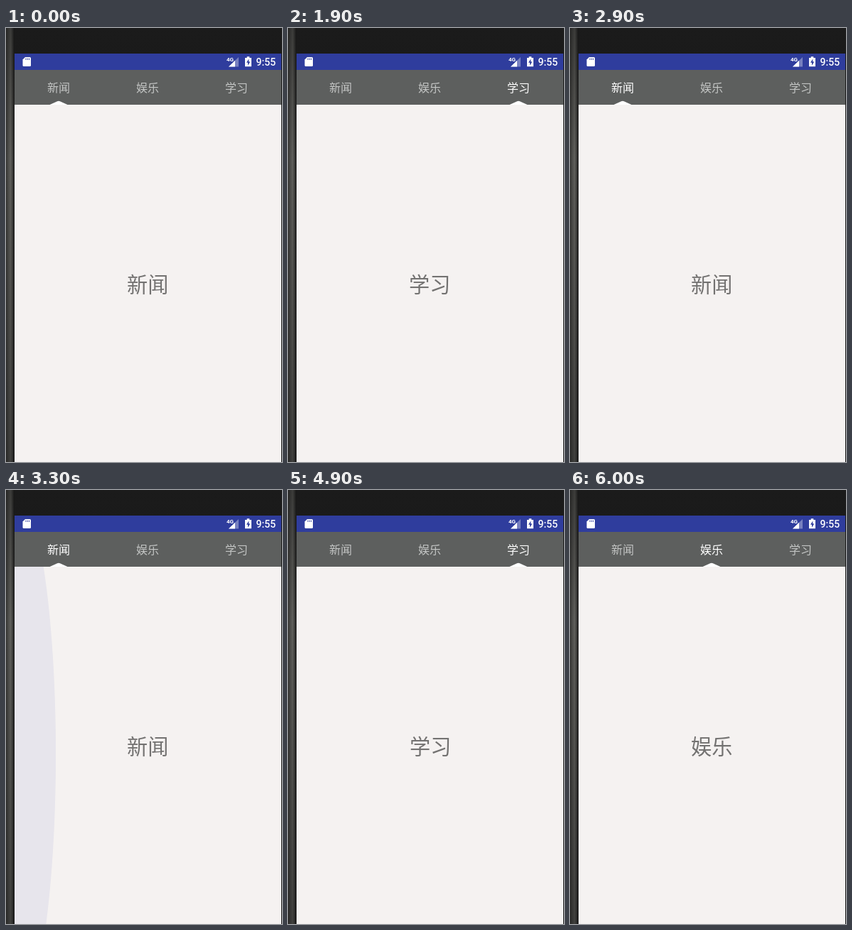
An HTML page for the animation above (6300 ms loop, 388 px wide and 611 px high).

```html
<!DOCTYPE html>
<html lang="zh">
<head>
<meta charset="utf-8">
<title>Tab pager</title>
<style>
  html, body { margin: 0; width: 100%; height: 100%; overflow: hidden; background: #151515; }
  svg { display: block; width: 388px; height: 611px; }
  text { font-family: "Noto Sans CJK SC", "Noto Sans CJK", sans-serif; text-anchor: middle; }
  .tab { font-size: 16px; fill: #c3c5c4; }
  .tab.on { fill: #fff; }
  .page { font-size: 29.2px; fill: #737271; }
  .status { font-family: Roboto, sans-serif; fill: #fff; text-anchor: start; }
</style>
</head>
<body>
<svg viewBox="0 0 388 611">
  <defs>
    <linearGradient id="top" x2="0" y2="1">
      <stop offset="0" stop-color="#1b1b1b"/>
      <stop offset="1" stop-color="#111"/>
    </linearGradient>
    <linearGradient id="side">
      <stop offset="0" stop-color="#343432"/>
      <stop offset=".3" stop-color="#50504d"/>
      <stop offset=".55" stop-color="#60605c"/>
      <stop offset=".8" stop-color="#3a3a38"/>
      <stop offset="1" stop-color="#161616"/>
    </linearGradient>
    <linearGradient id="shade" x2="0" y2="1">
      <stop offset="0" stop-color="#111" stop-opacity=".45"/>
      <stop offset=".3" stop-color="#111" stop-opacity="0"/>
      <stop offset="1" stop-color="#111" stop-opacity=".4"/>
    </linearGradient>
    <clipPath id="view"><rect x="12" y="108" width="375" height="503"/></clipPath>
  </defs>

  <rect width="388" height="611" fill="url(#top)"/>
  <rect width="12" height="611" fill="url(#side)"/>
  <rect width="12" height="611" fill="url(#shade)"/>
  <rect x="12" y="36" width="375" height="23" fill="#2f3d9d"/>
  <rect x="12" y="59" width="375" height="49" fill="#5d5f5e"/>
  <rect x="12" y="108" width="375" height="503" fill="#f5f2f1"/>

  <g fill="#fff">
    <path d="M27 41h6.5q1.5 0 1.5 1.5v10q0 1.5-1.5 1.5h-8.500q-1.500 0-1.500-1.500v-8z"/>
    <path d="M28 42.500v2.500M30.300 42.500v2.500M32.600 42.500v2.500" stroke="#2f3d9d" stroke-width=".9"/>
    <path d="M327 41v13.500h-14z" opacity=".35"/>
    <path d="M322 45.800v8.700h-9z"/>
    <path d="M336 42h2.700v-1.700h3.600v1.700h2.700v12.300h-9z"/>
    <path d="M341.300 43.500l-3.300 5.200h2v4l3.300-5.300h-2z" fill="#2f3d9d"/>
  </g>
  <text class="status" x="310" y="47" font-size="8" font-weight="700">4G</text>
  <text class="status" x="351.500" y="52.500" font-size="14" font-weight="500">9:55</text>

  <g id="tabs"></g>
  <path id="mark" d="M-12.500 108L-2 103.300Q0 102.300 2 103.300L12.500 108z" fill="#fff"/>
  <g clip-path="url(#view)">
    <ellipse id="glow" cx="12" cy="372" ry="370" fill="#3f51b5"/>
    <g id="pages"></g>
  </g>
</svg>
<script>
const LOOP = 6300, STEP = 100, WIDTH = 375, TAB = 125;
const names = ['新闻', '娱乐', '学习'];
// start, duration, page left, page reached
const moves = [
  [735, 540, 0, 1],
  [1435, 540, 1, 2],
  [2172, 770, 2, 0],
  [3802, 529, 0, 1],
  [4513, 530, 1, 2],
  [5067, 740, 2, 0],
  [5407, 570, 0, 1]
];

const $ = id => document.getElementById(id);
const clamp = x => Math.min(1, Math.max(0, x));
const snap = t => Math.floor(t / STEP) * STEP;
const easeOut = x => 1 - (1 - x) ** 5;

function label(parent, cls, str, x, y) {
  const el = document.createElementNS('http://www.w3.org/2000/svg', 'text');
  el.setAttribute('class', cls);
  el.setAttribute('x', x);
  el.setAttribute('y', y);
  el.textContent = str;
  return parent.appendChild(el);
}

const tabs = names.map((s, i) => label($('tabs'), 'tab', s, 74 + i * TAB, 89.5));
names.forEach((s, i) => label($('pages'), 'page', s, 199.3 + i * WIDTH, 372));

// Overscroll glow at the left edge
function drawGlow(t) {
  const rise = clamp((t - 2900) / 200), fall = clamp((3400 - t) / 250);
  $('glow').setAttribute('rx', 58 * rise);
  $('glow').setAttribute('opacity', 0.2 * rise * fall);
}

function draw(t) {
  const move = moves.filter(m => snap(m[0]) <= t).pop();
  let pos = 0;
  if (move) {
    const [start, dur, from, to] = move;
    pos = from + (to - from) * easeOut(clamp((t - start) / dur));
  }
  tabs.forEach((el, i) => el.classList.toggle('on', !!move && move[3] === i));
  $('mark').setAttribute('transform', `translate(${74 + pos * TAB} 0)`);
  $('pages').setAttribute('transform', `translate(${Math.round(-pos * WIDTH)} 0)`);
  drawGlow(t);
}

const begin = performance.now();
function tick() {
  draw(snap((performance.now() - begin) % LOOP));
  requestAnimationFrame(tick);
}
tick();
</script>
</body>
</html>
```
